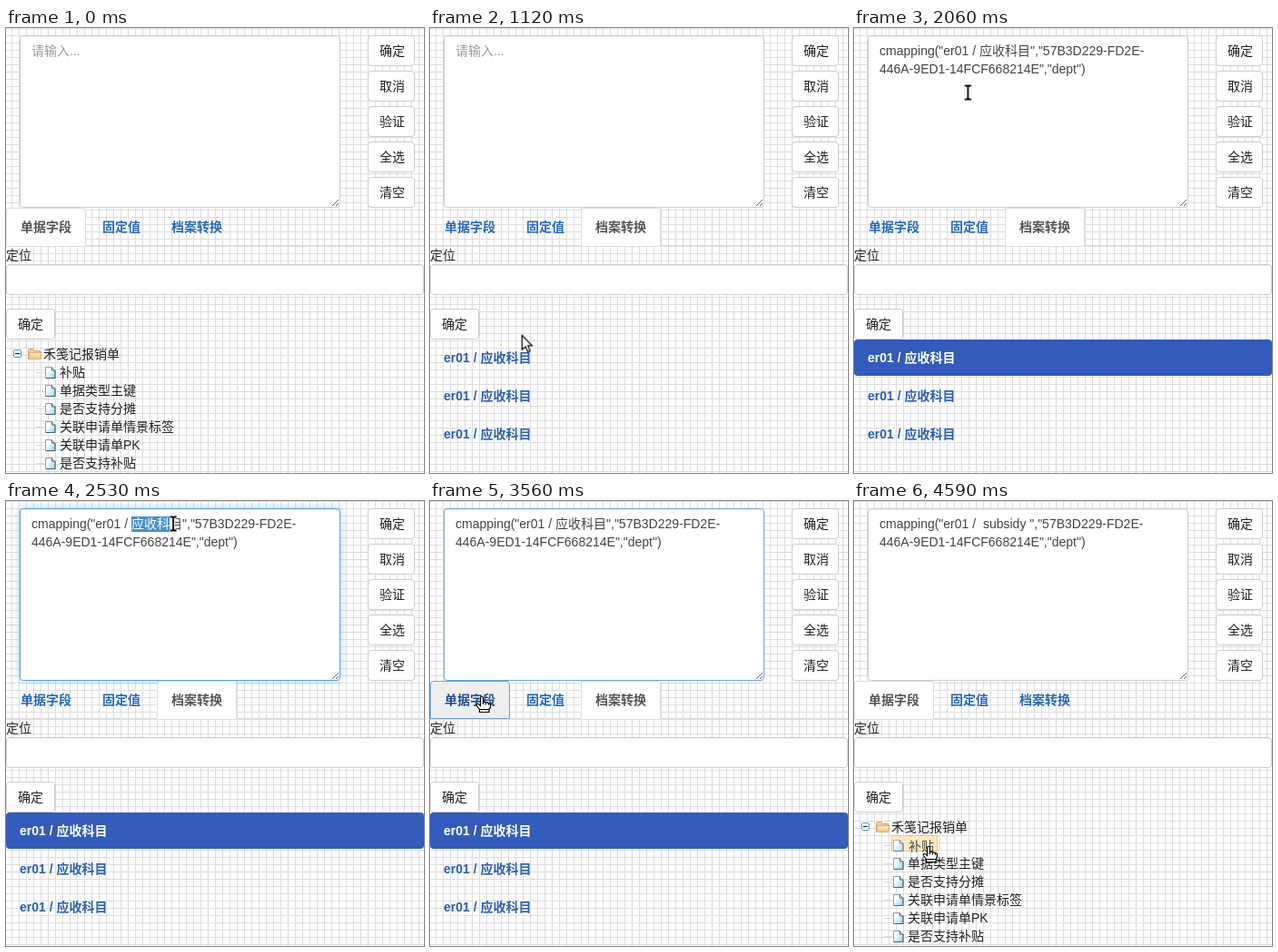
Write an HTML page that moves like this. It is 460x490 px and loops after 4830 ms.

```html
<!DOCTYPE html>
<html lang="zh-CN">
<head>
<meta charset="utf-8">
<title>字段映射</title>
<style>
* { box-sizing: border-box; }
html, body { margin: 0; width: 100%; height: 100%; overflow: hidden; }
body {
  position: relative;
  font: 14px/20px "Liberation Sans", "Noto Sans CJK SC", "Noto Sans CJK", sans-serif;
  color: #222;
  white-space: pre;
  background: #fff;
  background-image:
    linear-gradient(#ddd 1px, transparent 1px),
    linear-gradient(90deg, #ddd 1px, transparent 1px);
  background-size: 8px 8px;
  background-position: 6px 0;
  --loop: 4.83s infinite;
}
body > *, .view > *, .tree > *, .cursor > * { position: absolute; }
svg { display: block; overflow: visible; }

.btn {
  width: 52px; height: 34px; padding: 6px 0 6px 12px;
  border: 1px solid #ccc; border-radius: 4px; background: #fff;
}
.side { left: 398px; }
.field {
  border: 1px solid #ccc; border-radius: 4px; background: #fff;
  box-shadow: inset 0 1px 1px rgba(0,0,0,.075);
}
.area {
  left: 15px; top: 8px; width: 353px; height: 190px; color: #444;
  overflow: hidden; resize: both;
  animation: focus var(--loop) linear;
}
.area > * { position: absolute; left: 12px; top: 6px; }
.hint { color: #999; animation: hint var(--loop) step-end; }
.first { animation: first var(--loop) step-end; }
.second { animation: second var(--loop) step-end; }
.area .pick {
  left: 122px; top: 8px; height: 17px; line-height: 16px; overflow: hidden;
  color: #fff; background: #4a90ca; animation: pick var(--loop) step-end;
}

.view { inset: 0; }
.fields { animation: fields var(--loop) step-end; }
.files { animation: files var(--loop) step-end; }
.tabs {
  left: 0; top: 198px; width: 100%; height: 42px; display: flex; gap: 2px;
  border-bottom: 1px solid #ddd; font-weight: bold; color: #2468bd;
}
.tabs span {
  height: 42px; padding: 10px 15px; border: 1px solid transparent;
  border-radius: 4px 4px 0 0;
}
.tabs .on { color: #555; background: #fff; border-color: #ddd #ddd transparent; }
.files .tabs span:first-child { animation: press var(--loop) step-end; }

.item {
  left: 0; width: 100%; height: 40px; padding: 10px 15px; border-radius: 4px;
  font-weight: bold; color: #2a60b8;
}
.chosen { top: 343px; animation: chosen var(--loop) step-end; }

.tree { left: 0; top: 349px; }
.tree > span { left: 59px; }
.tree .icon { left: 42px; margin-top: 3px; width: 14px; height: 15px; }
.tree .twig { left: 34px; margin-top: 10px; width: 7px; border-top: 1px dotted #b5b5b5; }
.tree .node {
  left: 41px; top: 19px; width: 51px; height: 18px; line-height: 18px;
  border: 1px solid transparent; padding: 1px 0 0 17px;
  animation: node var(--loop) step-end;
}
.node svg { position: absolute; left: 0; top: 3px; }

.cursor { left: 0; top: 0; animation: move var(--loop) linear; }
.arrow { left: -1px; animation: arrow var(--loop) step-end; }
.beam { animation: beam var(--loop) step-end; }
.hand { animation: hand var(--loop) step-end; }

/* content states */
@keyframes hint { 0% { opacity: 1 } 26.915%, 100% { opacity: 0 } }
@keyframes first { 0% { opacity: 0 } 26.915% { opacity: 1 } 95.031%, 100% { opacity: 0 } }
@keyframes second { 0% { opacity: 0 } 95.031%, 100% { opacity: 1 } }
@keyframes fields { 0% { visibility: visible } 11.284% { visibility: hidden } 74.534%, 100% { visibility: visible } }
@keyframes files { 0% { visibility: hidden } 11.284% { visibility: visible } 74.534%, 100% { visibility: hidden } }
@keyframes pick {
  0% { width: 0 }
  50.311% { width: 14px }
  51.2% { width: 28px }
  51.9% { width: 42px }
  53.8% { width: 56px }
  72.671%, 100% { width: 0 }
}
@keyframes focus {
  0%, 46.584% { border-color: #ccc; box-shadow: inset 0 1px 1px rgba(0,0,0,.075), 0 0 8px rgba(102,175,233,0) }
  49.7%, 72.671% { border-color: #5ba3dc; box-shadow: inset 0 1px 1px rgba(0,0,0,.075), 0 0 8px rgba(102,175,233,.6) }
  73.706% { border-color: #6ba6d6; box-shadow: inset 0 1px 1px rgba(0,0,0,.075), 0 0 8px rgba(102,175,233,0) }
  75.776%, 100% { border-color: #ccc; box-shadow: inset 0 1px 1px rgba(0,0,0,.075), 0 0 8px rgba(102,175,233,0) }
}
@keyframes press {
  0% { background: transparent; border-color: transparent }
  67.453% { background: #eee; border-color: #eee #eee #ddd; color: #1c4f96 }
  72.671%, 100% { background: #eee; border-color: #66a3dc; color: #1c4f96 }
}
@keyframes chosen {
  0% { background: transparent; color: #2a60b8 }
  23.561% { background: #eee; color: #2a60b8 }
  26.915%, 100% { background: #335bbc; color: #fff }
}
@keyframes node {
  0% { background: transparent; border-color: transparent; opacity: 1 }
  95.031%, 100% { background: #ffe6b0; border-color: #ffb951; opacity: .8; padding: 2px 0 0 18px }
}

/* pointer */
@keyframes move {
  0%, 3.106% { transform: translate(448px, 18px) }
  6.832% { transform: translate(330px, 110px) }
  9.524% { transform: translate(232px, 190px) }
  11.284%, 14.079% { transform: translate(217px, 203px) }
  19.669% { transform: translate(140px, 285px) }
  24.845%, 27.95% { transform: translate(84px, 362px) }
  33.126% { transform: translate(76px, 244px) }
  37.681%, 38.509% { transform: translate(112px, 120px) }
  46.584%, 50.311% { transform: translate(138px, 25px) }
  52.381% { transform: translate(184px, 25px) }
  55.901%, 61.077% { transform: translate(195px, 25px) }
  66.253% { transform: translate(80px, 170px) }
  69.151% { transform: translate(62px, 238px) }
  71.636%, 75.362% { transform: translate(57px, 215px) }
  80.331% { transform: translate(105px, 346px) }
  83.23%, 84.058% { transform: translate(104px, 361px) }
  89.234%, 100% { transform: translate(82px, 380px) }
}
@keyframes arrow {
  0% { opacity: 0 } 3.106% { opacity: 1 } 5.59% { opacity: 0 }
  11.284% { opacity: 1 } 17.971% { opacity: 0 }
  20.269% { opacity: 1 } 23.561% { opacity: 0 }
  28.778% { opacity: 1 } 30.932% { opacity: 0 }
  32.422% { opacity: 1 } 34.824% { opacity: 0 }
  74.534% { opacity: 1 } 77.06% { opacity: 0 }
  78.364% { opacity: 1 } 87.785%, 100% { opacity: 0 }
}
@keyframes beam {
  0% { opacity: 0 } 5.59% { opacity: 1 } 9.834% { opacity: 0 }
  17.971% { opacity: 1 } 20.269% { opacity: 0 }
  30.932% { opacity: 1 } 32.422% { opacity: 0 }
  34.824% { opacity: 1 } 67.453% { opacity: 0 }
  77.06% { opacity: 1 } 78.364%, 100% { opacity: 0 }
}
@keyframes hand {
  0% { opacity: 0 } 9.834% { opacity: 1 } 11.284% { opacity: 0 }
  23.561% { opacity: 1 } 28.778% { opacity: 0 }
  67.453% { opacity: 1 } 74.534% { opacity: 0 }
  87.785%, 100% { opacity: 1 }
}
</style>
</head>
<body><svg width="0" height="0"><defs>
  <linearGradient id="paper" x2="1" y2="1"><stop offset=".3" stop-color="#fff"/><stop offset="1" stop-color="#8fd0ea"/></linearGradient>
  <linearGradient id="tan" x2="0" y2="1"><stop stop-color="#fbe8c0"/><stop offset="1" stop-color="#ecc586"/></linearGradient>
  <symbol id="page" viewBox="0 0 14 15" overflow="visible">
    <path d="M1.5 1.5h7l3.5 3.5v8.5h-10.500z" fill="url(#paper)" stroke="#7fa3b5"/>
    <path d="M8.5 1.5v3.5h3.5v8.5h-10" fill="none" stroke="#3f6478"/>
  </symbol>
</defs></svg><div class="field area"><span class="hint">请输入...</span><span class="first">cmapping("er01 / 应收科目","57B3D229-FD2E-
446A-9ED1-14FCF668214E","dept")</span><span class="second">cmapping("er01 /  subsidy ","57B3D229-FD2E-
446A-9ED1-14FCF668214E","dept")</span><span class="pick">应收科目</span></div><div class="btn side" style="top:8px">确定</div><div class="btn side" style="top:47px">取消</div><div class="btn side" style="top:86px">验证</div><div class="btn side" style="top:125px">全选</div><div class="btn side" style="top:164px">清空</div><div style="left:0;top:240px">定位</div><div class="field" style="left:0;top:260px;width:100%;height:34px"></div><div class="btn" style="left:0;top:309px;width:54px">确定</div><div class="view fields"><div class="tabs"><span class="on">单据字段</span><span>固定值</span><span>档案转换</span></div><div class="tree"><svg style="left:8px;top:5px" width="9" height="9"><rect x=".5" y=".5" width="8" height="8" rx="1" fill="#e9f6fc" stroke="#4a9cc4"/><path d="M2 4.5h5" stroke="#222"/></svg><svg style="left:24px;top:3px" width="16" height="14"><path d="M.5 12.5v-10l1-1h4l1.5 2h6.5v9z" fill="#f0cf94" stroke="#d0a866"/><path d="M1.5 5.500h13.500l-1 7h-13z" fill="url(#tan)" stroke="#d8ae6c"/></svg><span style="left:41px">禾笺记报销单</span><i class="twig" style="top:20px"></i><div class="node"><svg width="14" height="15"><use href="#page"/></svg>补贴</div><i class="twig" style="top:40px"></i><svg class="icon" style="top:40px"><use href="#page"/></svg><span style="top:40px">单据类型主键</span><i class="twig" style="top:60px"></i><svg class="icon" style="top:60px"><use href="#page"/></svg><span style="top:60px">是否支持分摊</span><i class="twig" style="top:80px"></i><svg class="icon" style="top:80px"><use href="#page"/></svg><span style="top:80px">关联申请单情景标签</span><i class="twig" style="top:100px"></i><svg class="icon" style="top:100px"><use href="#page"/></svg><span style="top:100px">关联申请单PK</span><i class="twig" style="top:120px"></i><svg class="icon" style="top:120px"><use href="#page"/></svg><span style="top:120px">是否支持补贴</span></div></div><div class="view files"><div class="tabs"><span>单据字段</span><span>固定值</span><span class="on">档案转换</span></div><div class="item chosen">er01 / 应收科目</div><div class="item" style="top:385px">er01 / 应收科目</div><div class="item" style="top:427px">er01 / 应收科目</div></div><div class="cursor"><svg class="arrow" width="12" height="20"><path d="M.5 .8V16.5L4.2 13.2 6.8 19 9.4 17.9 6.9 12.2H11.6z" fill="#fff" stroke="#000" stroke-width="1.2"/></svg><svg class="beam" width="1" height="1"><path d="M-3.5-7.5h2.5l1 1 1-1h2.5M0-6.5v13M-3.5 7.5h2.5l1-1 1 1h2.5" fill="none" stroke="#fff" stroke-width="4"/><path d="M-3.5-7.5h2.5l1 1 1-1h2.5M0-6.5v13M-3.5 7.5h2.5l1-1 1 1h2.5" fill="none" stroke="#000" stroke-width="1.8"/></svg><svg class="hand" width="1" height="1"><path d="M-1.5 9.5V1.8Q-1.5 .5 0 .5T1.5 1.8V6.5Q3.5 5.6 4.5 7 6.5 6.3 7.3 7.7 9.5 7.4 9.5 9.5V12L8 14.5V17.5H-2.5V14.5L-5.5 10.5Q-6.3 9 -5 8.3 -3.7 8 -1.5 10.5z" fill="#fff" stroke="#000" stroke-width="1.2"/><path d="M-2.5 14.5H8M1.5 6.5V9M4.5 7.5V9.5M7.3 8V10" stroke="#000" fill="none"/></svg></div></body>
</html>
```
